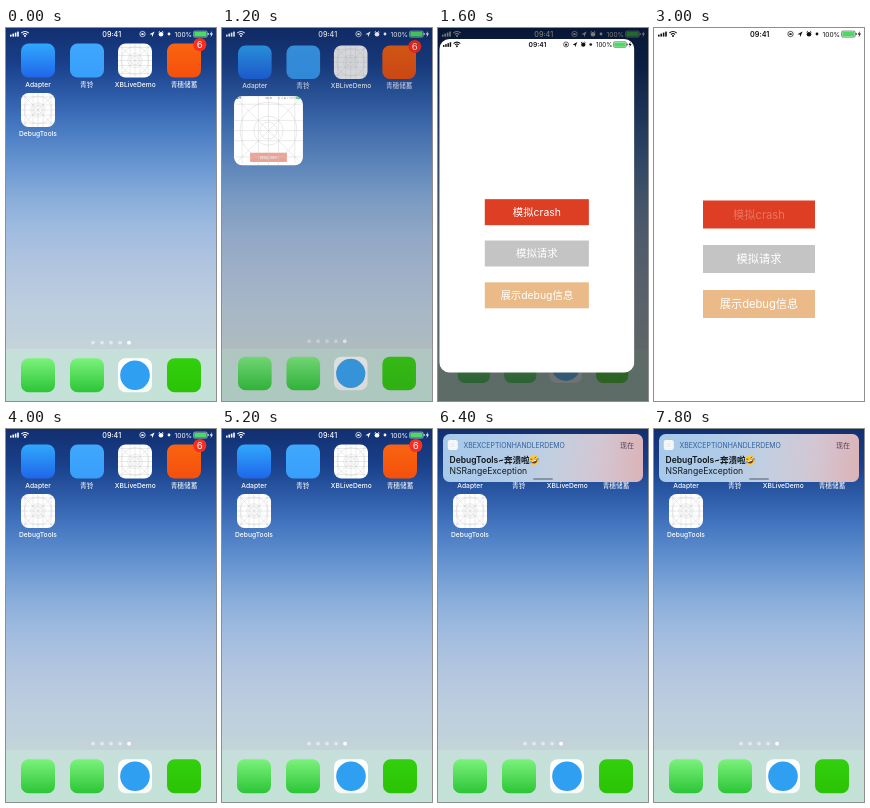
Animation, 210 px wide and 373 px high, one loop 8000 ms. Source, as an HTML page with a canvas:

```html
<!DOCTYPE html>
<html lang="zh">
<head>
<meta charset="utf-8">
<title>Phone demo</title>
<style>
html, body { margin: 0; width: 100%; height: 100%; overflow: hidden; background: #122f70; }
canvas { display: block; width: 100vw; height: 100vh; }
</style>
</head>
<body>
<canvas id="stage"></canvas>
<script>
const W = 210, H = 373, LOOP = 8000, STEP = 200;
const OPEN = 1100, OPENED = 1800, PRESS = 3000, CRASH = 4000, BANNER = 5850;
const FONT = 'Inter, "Noto Sans CJK SC", "Noto Sans CJK", sans-serif';
const canvas = document.getElementById('stage');
const g = canvas.getContext('2d');

const mix = (a, b, p) => a + (b - a) * p;

// Critically damped spring from 0 to 1, t in seconds.
function spring(t, w) {
  if (t <= 0) return 0;
  const p = 1 - (1 + w * t) * Math.exp(-w * t);
  return p > 0.98 ? 1 : p;
}

function group(draw) {
  g.save();
  draw();
  g.restore();
}

function gradient(x0, y0, x1, y1, colors) {
  const fill = g.createLinearGradient(x0, y0, x1, y1);
  colors.forEach(([at, color]) => fill.addColorStop(at, color));
  return fill;
}

function roundPath(x, y, w, h, r) {
  g.beginPath();
  g.moveTo(x + r, y);
  g.arcTo(x + w, y, x + w, y + h, r);
  g.arcTo(x + w, y + h, x, y + h, r);
  g.arcTo(x, y + h, x, y, r);
  g.arcTo(x, y, x + w, y, r);
  g.closePath();
}

function box(x, y, w, h, r, fill) {
  roundPath(x, y, w, h, r);
  g.fillStyle = fill;
  g.fill();
}

function disc(x, y, r, fill) {
  g.beginPath();
  g.arc(x, y, r, 0, 7);
  g.fillStyle = fill;
  g.fill();
}

function ring(x, y, r) {
  g.beginPath();
  g.arc(x, y, r, 0, 7);
  g.stroke();
}

function poly(points, fill) {
  g.beginPath();
  points.forEach(([x, y]) => g.lineTo(x, y));
  g.closePath();
  g.fillStyle = fill;
  g.fill();
}

function line(x0, y0, x1, y1) {
  g.beginPath();
  g.moveTo(x0, y0);
  g.lineTo(x1, y1);
  g.stroke();
}

function text(str, x, y, size, color, align = 'center', weight = 400) {
  g.font = `${weight} ${size}px ${FONT}`;
  g.textAlign = align;
  g.textBaseline = 'alphabetic';
  g.fillStyle = color;
  g.fillText(str, x, y);
}

function statusBar(color, timeWeight) {
  g.strokeStyle = color;
  for (let i = 0; i < 4; i++) {
    g.fillStyle = color;
    g.fillRect(4 + i * 2.4, 6.6 - i, 1.6, 2 + i);
  }
  g.lineWidth = 1.1;
  for (const r of [2.9, 5.1]) {
    g.beginPath();
    g.arc(19, 8.6, r, -Math.PI * 0.75, -Math.PI * 0.25);
    g.stroke();
  }
  disc(19, 7.9, 1, color);
  text('09:41', 105.7, 8.7, 7.2, color, 'center', timeWeight);

  g.lineWidth = 0.7;
  ring(136.5, 6, 2.7);
  box(135.4, 5.3, 2.2, 1.8, 0.3, color);
  poly([[143.4, 6.3], [148.6, 3.4], [146.2, 8.9], [145.8, 6.5]], color);
  disc(155, 6.2, 2.3, color);
  g.lineWidth = 1;
  line(152.6, 4.2, 153.7, 3.3);
  line(156.3, 3.3, 157.4, 4.2);
  disc(163, 6, 1.4, color);
  text('100%', 168.6, 8.5, 6.6, color, 'left');
  g.lineWidth = 0.5;
  roundPath(187.6, 3.1, 13.6, 6, 1.3);
  g.stroke();
  box(188.3, 3.8, 12.2, 4.6, 0.7, '#4cd964');
  box(201.7, 5.1, 0.9, 2, 0.3, color);
  poly([[205.9, 2.9], [203.7, 6.5], [205.2, 6.5], [204.6, 9.2], [207, 5.5], [205.4, 5.5]], color);
}

// Blank app template icon, drawn in a 34 unit square.
function gridIcon(x, y, size) {
  group(() => {
    g.translate(x, y);
    g.scale(size / 34, size / 34);
    box(0, 0, 34, 34, 7.6, '#fff');
    g.clip();
    g.strokeStyle = '#cbcbcb';
    g.lineWidth = 0.4;
    for (const c of [4, 12, 17, 22, 30]) {
      line(c, 0, c, 34);
      line(0, c, 34, c);
    }
    line(0, 0, 34, 34);
    line(34, 0, 0, 34);
    for (const r of [4.2, 7.2, 14]) ring(17, 17, r);
  });
}

function tile(x, y, top, bottom) {
  box(x, y, 34, 34, 7.6, gradient(0, y, 0, y + 34, [[0, top], [1, bottom]]));
}

function wallpaper() {
  g.fillStyle = gradient(0, 0, 0, H, [
    [0, '#122f70'], [0.1, '#1a418b'], [0.19, '#305fac'], [0.27, '#487ac2'],
    [0.37, '#6a97d2'], [0.46, '#8aaeda'], [0.55, '#a2bcdf'], [0.64, '#b1c5df'],
    [0.74, '#bccddf'], [0.86, '#c4d4d9']
  ]);
  g.fillRect(0, 0, W, H);
  g.fillStyle = gradient(0, 321, 0, H, [[0, '#c6dfda'], [1, '#c3e2d6']]);
  g.fillRect(0, 321, W, H - 321);
}

function label(str, x, y) {
  text(str, x, y, 6.7, '#fff', 'center', 500);
}

function icons(showTools) {
  tile(15, 15.5, '#2fa8fd', '#2066ea');
  tile(64, 15.5, '#3fa7fd', '#379ffa');
  gridIcon(112, 15.5, 34);
  tile(161, 15.5, '#fa6410', '#f4500c');
  disc(193.8, 16.5, 6.6, '#fa2d1e');
  text('6', 193.8, 20, 9.6, '#fff');
  label('Adapter', 32, 58.6);
  label('青铃', 80.7, 58.6);
  label('XBLiveDemo', 129.3, 58.6);
  label('青穗储蓄', 178, 58.6);

  if (showTools) gridIcon(15, 65, 34);
  label('DebugTools', 32, 107.8);

  for (let i = 0; i < 5; i++) {
    disc(87 + i * 9, 314.7, 1.9, i === 4 ? '#fff' : 'rgba(255,255,255,.5)');
  }
  tile(15, 330.3, '#7bf27c', '#2cc536');
  tile(64, 330.3, '#7bf27c', '#2cc536');
  tile(112, 330.3, '#fff', '#f8f8f8');
  disc(129, 347.3, 14.8, '#2f9ff2');
  tile(161, 330.3, '#32d00c', '#2bc305');
}

function home(open, banner) {
  wallpaper();
  group(() => {
    const s = 1 - 0.057 * open;
    g.translate(W / 2, H / 2);
    g.scale(s, s);
    g.translate(-W / 2, -H / 2);
    g.globalAlpha = 1 - 0.35 * open;
    icons(open === 0);
  });
  group(() => {
    g.globalAlpha = 1 - banner;
    statusBar('#fff', 500);
  });
  g.fillStyle = `rgba(0,0,0,${0.57 * open})`;
  g.fillRect(0, 0, W, H);
}

function button(y, color, str, ink = '#fff') {
  g.fillStyle = color;
  g.fillRect(49, y, 112, 28);
  text(str, 105, y + 18, 11.2, ink);
}

function app(pressed) {
  g.fillStyle = '#fff';
  g.fillRect(0, 0, W, H);
  statusBar('#111', 600);
  button(172.5, '#dd3e24', '模拟crash', pressed ? '#e97662' : '#fff');
  button(217, '#c4c4c4', '模拟请求');
  button(262, '#eaba88', '展示debug信息');
}

// The app card grows out of its icon; its height lags behind its width.
function openingCard(p) {
  const w = mix(34, W, p);
  const h = mix(34, H, p ** 1.4);
  const x = mix(32, W / 2, p) - w / 2;
  const y = mix(82, H / 2, p) - h / 2;
  group(() => {
    roundPath(x, y, w, h, mix(7.6, 10.5, p));
    g.clip();
    group(() => {
      g.translate(x, y);
      g.scale(w / W, w / W);
      app(false);
    });
    g.globalAlpha = Math.max(0, 1 - p * 2.5);
    gridIcon(x, y, w);
  });
}

function laughingFace(x, y) {
  group(() => {
    g.translate(x, y);
    g.rotate(-0.4);
    disc(0, 0, 5, '#fcc93a');
    g.strokeStyle = '#6b3d10';
    g.lineWidth = 0.8;
    line(-3, -2.2, -1.1, -1.3);
    line(3, -2.2, 1.1, -1.3);
    g.beginPath();
    g.arc(0, 0.3, 3.1, 0, Math.PI);
    g.fillStyle = '#7a3514';
    g.fill();
    box(-2.4, 0.3, 4.8, 1, 0.3, '#fff');
    disc(-4, 0.8, 1.2, '#4fb4ee');
    disc(4, 0.8, 1.2, '#4fb4ee');
  });
}

function notification(p) {
  group(() => {
    g.translate(0, -60 * (1 - p));
    box(5, 5, 200, 48, 6.5, gradient(5, 15, 205, 35, [
      [0, '#a6c9ea'], [0.3, '#b0cbe8'], [0.55, '#c3cfe0'], [0.78, '#d3c6d2'], [1, '#dbb3b8']
    ]));
    gridIcon(9.8, 11, 10);
    text('XBEXCEPTIONHANDLERDEMO', 25.5, 18.7, 6.9, '#30609a', 'left');
    text('现在', 196, 18.7, 7, '#5a4058', 'right');
    text('DebugTools~奔溃啦', 11.5, 34.2, 8.5, '#101418', 'left', 600);
    laughingFace(96, 31);
    text('NSRangeException', 11.5, 45.2, 8.6, '#14181c', 'left');
    box(95, 49, 20, 2, 1, '#8894a6');
  });
}

function draw(now) {
  const t = Math.floor((now % LOOP) / STEP) * STEP;
  const dpr = window.devicePixelRatio || 1;
  const w = Math.round(innerWidth * dpr), h = Math.round(innerHeight * dpr);
  if (canvas.width !== w || canvas.height !== h) {
    canvas.width = w;
    canvas.height = h;
  }
  g.setTransform(w / W, 0, 0, h / H, 0, 0);

  if (t >= OPENED && t < CRASH) {
    app(t >= PRESS);
  } else {
    const open = t < OPENED ? spring((t - OPEN) / 1000, 8.2) : 0;
    const banner = spring((t - BANNER) / 1000, 12);
    home(open, banner);
    if (open > 0) openingCard(open);
    if (banner > 0) notification(banner);
  }
  requestAnimationFrame(tick);
}

const start = performance.now();
function tick() {
  draw(performance.now() - start);
}
tick();
</script>
</body>
</html>
```
